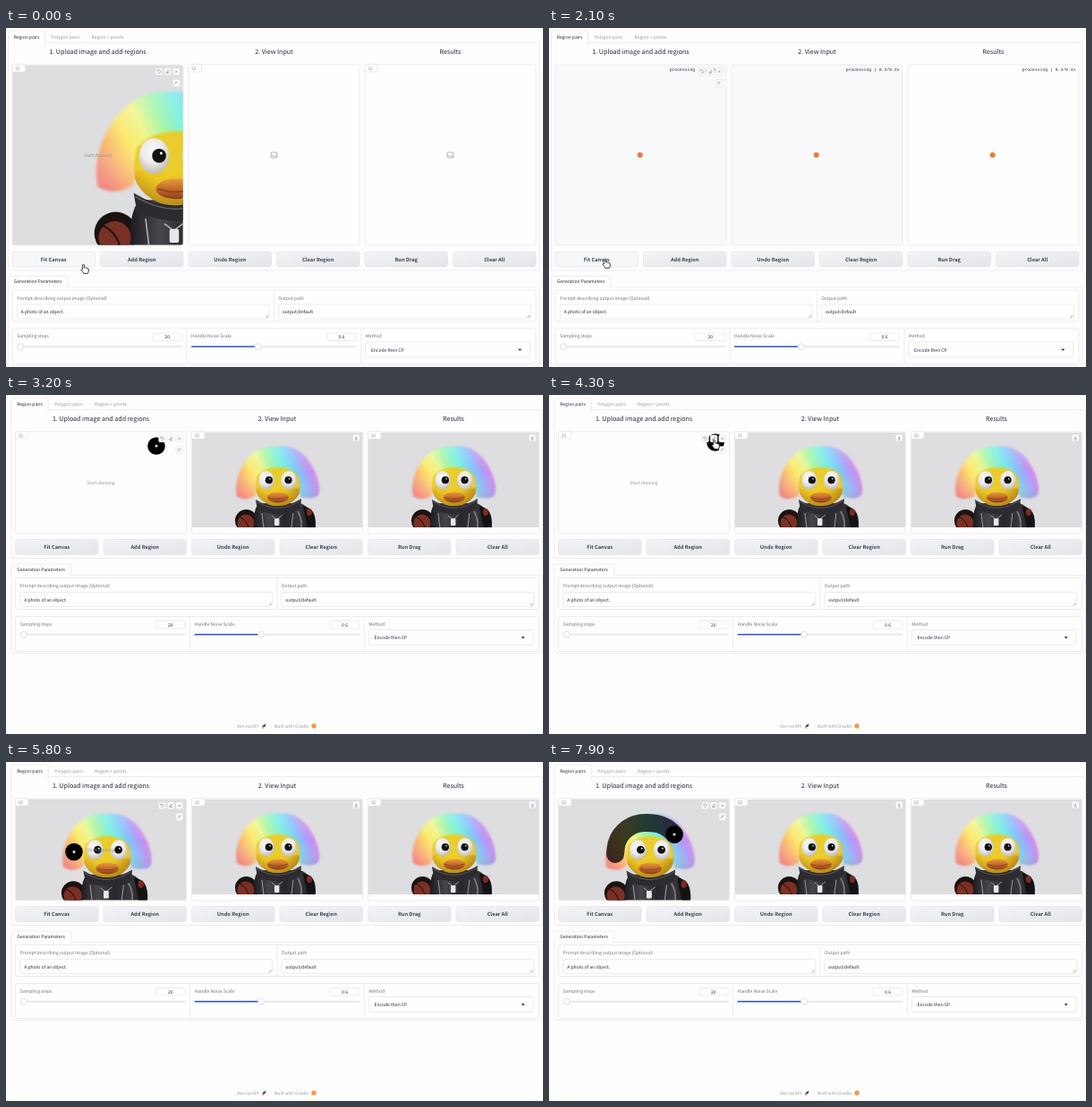
Recreate the animation shown at these times as an HTML page. Size 600 by 379 pixels, loop 8 s.

```html
<!DOCTYPE html>
<html lang="en">
<head>
<meta charset="utf-8">
<title>Region editor</title>
<style>
  html, body { margin: 0; width: 100%; height: 100%; overflow: hidden; background: #fefdfe; }
  svg { display: block; width: 100vw; height: 100vh; }
  text { font-family: "Noto Sans CJK JP", "Noto Sans CJK SC", "Noto Sans CJK", "Open Sans", sans-serif; white-space: pre; text-rendering: geometricPrecision; }
  .mono { font-family: "Liberation Mono", "DejaVu Sans Mono", monospace; }
  .line { fill: none; stroke: #e5e7eb; stroke-width: .7; }
  .box { fill: #fefefe; stroke: #e2e4e9; stroke-width: .7; }
  .icon { fill: none; stroke: #7b818c; stroke-width: .6; }
</style>
</head>
<body>
<svg id="stage" viewBox="0 0 600 379" preserveAspectRatio="none"></svg>
<script>
const LOOP = 8000;
const SHIFT = { x: 3.5, y: -88.5 };   // where the page moves once the canvas is fitted
const TIME = { busy: 1800, fitted: 2300, photo: 4700, draw: 6300 };
const COLUMNS = [7, 204, 401];
const INK = '#1f2937', MUTED = '#959aa4', LABEL = '#6b7280';

// Cursor centre: time, x, y
const CURSOR = [
  [0, 88, 269], [100, 88, 269], [300, 86, 268.5], [600, 79, 267], [1300, 64, 263],
  [2450, 64, 263], [2700, 95, 170], [3050, 168, 57], [3400, 168, 57], [4000, 186, 53],
  [4850, 186, 53], [5300, 118, 80], [5650, 76, 100.5], [6000, 76, 100.5], [6300, 74, 103]
];
// Share of the stroke drawn: time, length in pixels
const STROKE = [[6300, 0], [6600, 7], [6800, 11.5], [7000, 24], [7400, 60], [7900, 1], [8000, 1]];

const rect = (x, y, w, h, r = 2, attrs = 'class="box"') =>
  `<rect x="${x}" y="${y}" width="${w}" height="${h}" rx="${r}" ${attrs}/>`;
const path = (d, attrs = 'class="line"') => `<path d="${d}" ${attrs}/>`;
const text = (x, y, s, { size = 5, fill = LABEL, anchor = 'start', weight = 400, cls = '' } = {}) =>
  `<text x="${x}" y="${y}" font-size="${size}" fill="${fill}" text-anchor="${anchor}" font-weight="${weight}" class="${cls}">${s}</text>`;
const group = (id, body, attrs = '') => `<g id="${id}" ${attrs}>${body}</g>`;
const stops = list => list.map((c, i) =>
  `<stop offset="${i / (list.length - 1)}" stop-color="${c}"/>`).join('');

const defs = `<defs>
  <linearGradient id="hair" y1=".75" x2="1" y2=".45">${stops(['#f2937c', '#f9bd72', '#fbe96a', '#eef58c', '#9df5a4', '#6fefe0', '#7cc6fb', '#b793f6', '#f58bd2'])}</linearGradient>
  <linearGradient id="shine" x2="0" y2="1"><stop offset="0" stop-color="#fff" stop-opacity=".25"/><stop offset=".5" stop-color="#fff" stop-opacity="0"/><stop offset="1" stop-color="#f2558f" stop-opacity=".25"/></linearGradient>
  <radialGradient id="skin" cx=".42" cy=".35" r=".75">${stops(['#f6dc33', '#e9c522', '#a87516'])}</radialGradient>
  <radialGradient id="white" cx=".45" cy=".35" r=".7">${stops(['#fafafa', '#ecebea', '#b9b4aa'])}</radialGradient>
  <linearGradient id="beak" x2="0" y2="1">${stops(['#e3a03c', '#c8682c', '#86401c'])}</linearGradient>
  <linearGradient id="coat" x2="1">${stops(['#1c1c20', '#46464c', '#26262b', '#38383e', '#131316'])}</linearGradient>
  <linearGradient id="button" x2="1" y2="1">${stops(['#f3f4f6', '#e3e5ea'])}</linearGradient>
  <filter id="soft" x="-10%" y="-10%" width="120%" height="120%"><feGaussianBlur stdDeviation=".8"/></filter>
  <clipPath id="canvasClip">${rect(7.4, 41.4, 190.2, 201.2, 2, 'id="clipBox"')}</clipPath>
  <clipPath id="photoClip">${rect(0, 0, 190, 106, 0, '')}</clipPath>
</defs>`;

const HAIR = 'M50 71C47 55 53 38 65 26C74 17 84 15 96 16C112 13 128 24 135 39C141 50 144 62 141 70C135 75 128 73 121 72L118 48L95 40L73 48L71 70C64 75 56 75 50 71Z';
const eye = (x, pupil) => `
  <ellipse cx="${x}" cy="53.3" rx="8.8" ry="10.4" fill="url(#white)"/>
  <circle cx="${pupil}" cy="53.2" r="4.1" fill="#111"/>
  <circle cx="${pupil + 1.2}" cy="51.7" r=".8" fill="#fff"/>`;

const photo = group('photo', `
  ${rect(0, 0, 205, 106, 0, 'fill="#dedddf"')}
  <circle cx="60.5" cy="98.5" r="12.5" fill="#1b1210"/>
  <ellipse cx="60" cy="101" rx="9.5" ry="9.5" fill="#7a3024"/>
  ${path('M53 94Q62 98 64 110', 'fill="none" stroke="#1b0f0c" stroke-width="1"')}
  ${path('M70 106Q67 90 74 79L121 79Q135 84 137 106Z', 'fill="url(#coat)"')}
  ${path('M124 83Q137 83 138 100L138 106L129 106Z', 'fill="#131215"')}
  <ellipse cx="131" cy="89" rx="3" ry="4" fill="#7c2a22"/>
  <ellipse cx="96" cy="58" rx="26" ry="24.5" fill="url(#skin)"/>
  ${path('M71 75Q95 90 122 74L121 85Q98 97 73 86Z', 'fill="#2b2b30"')}
  ${path('M72 77Q96 92 121 76', 'fill="none" stroke="#606066" stroke-width=".8"')}
  ${path('M78 90L80 106M113 90L111 106M89 93L94.5 97L101 92', 'fill="none" stroke="#b5b5b8" stroke-width=".8"')}
  ${path('M118 88Q123 96 122 106', 'fill="none" stroke="#7d7d84" stroke-width="1.6"')}
  ${rect(92, 96, 5.5, 8, 1, 'fill="#e8e8e8"')}
  ${path(HAIR, 'fill="url(#hair)" filter="url(#soft)"')}
  ${path(HAIR, 'fill="url(#shine)" filter="url(#soft)"')}
  ${path('M72 62Q70 46 84 41Q97 36 111 42Q121 47 120 62Z', 'fill="#e9cd2e" filter="url(#soft)"')}
  ${eye(83, 85.9)}${eye(108, 107.6)}
  <ellipse cx="96" cy="72.5" rx="12" ry="6" fill="url(#beak)"/>
  ${path('M85 72.5Q96 76.5 107 72', 'fill="none" stroke="#87441c" stroke-width=".8"')}`);

const pictureIcon = (x, y, s) =>
  `<g transform="translate(${x} ${y}) scale(${s})">${rect(-3.3, -3, 6.6, 6, .6, 'class="icon"')}${path('M-3 2L-1 0L1 2L2 .8L3.2 2M1.2-1.2h.6', 'class="icon"')}</g>`;
const badge = x => path(`M${x} 41h14.5v6q0 2-2 2h-12.5Z`, 'class="box"') + pictureIcon(x + 6, 45.2, .55);
const iconButton = (x, y, d) => rect(x - 3.8, y - 3.8, 7.6, 7.6, 1.3) +
  `<g transform="translate(${x} ${y})">${path(d, 'class="icon"')}</g>`;

const tabs = rect(2.5, 3, 41, 18, 2) +
  path('M43.5 16.5H594Q596 16.5 596 18.5') +
  rect(3, 16.2, 40, 6, 0, 'fill="#fefdfe"') +
  text(23, 11.9, 'Region pairs', { fill: INK, anchor: 'middle' }) +
  text(66.5, 11.9, 'Polygon pairs', { fill: MUTED, anchor: 'middle' }) +
  text(113.5, 11.9, 'Region + points', { fill: MUTED, anchor: 'middle' });

const headings = ['1. Upload image and add regions', '2. View Input', 'Results']
  .map((s, i) => text(COLUMNS[i] + 95.5, 28.9, s, { size: 7.1, fill: INK, anchor: 'middle' })).join('');

const panels = COLUMNS.map(x => rect(x, 41, 191, 202, 2.5, 'class="box panel"')).join('');
const views = COLUMNS.slice(1);

const empty = group('empty', views.map(x => badge(x) + pictureIcon(x + 95.5, 142, 1)).join(''));
const filled = group('filled', views.map(x =>
  `<g transform="translate(${x + .4} 42)" clip-path="url(#photoClip)"><use href="#photo"/></g>` +
  badge(x) + iconButton(x + 183.7, 48, 'M0-2V1M-1.3-.2L0 1L1.3-.2M-1.8 2H1.8')).join(''));

const busy = group('busy', COLUMNS.map(x =>
  `<circle cx="${x + 94.7}" cy="142" r="3" fill="#ee7a35"/>` +
  text(x + 187.5, 47.8, '', { size: 4.75, fill: INK, anchor: 'end', cls: 'mono timer' })).join(''));

const tools = iconButton(171, 48.7, 'M-1.6-.8A1.8 1.8 0 1 1-1.5 1M-1.8-2V-.6H-.4') +
  iconButton(180.6, 48.7, 'M-1.8 1.9H1.8M-1.5 1L.7-1.8L1.8-.6L0 1.2Z') +
  iconButton(190.2, 48.7, 'M-1.4-1.4L1.4 1.4M1.4-1.4L-1.4 1.4') +
  iconButton(190.4, 61.4, 'M-1.7 1.8Q-1.6 0-.6.2L1.8-1.9M-1.7-1.2H0');

const buttons = ['Fit Canvas', 'Add Region', 'Undo Region', 'Clear Region', 'Run Drag', 'Clear All']
  .map((s, i) => {
    const x = COLUMNS[i >> 1] + (i % 2) * 98.5;
    return rect(x, 250, 92.5, 17, 3, `fill="url(#button)" stroke="#e0e3e8" stroke-width=".6" ${i ? '' : 'id="fit"'}`) +
      text(x + 46.2, 260.6, s, { size: 5.7, fill: '#374151', anchor: 'middle', weight: 700 });
  }).join('');

const field = (x, label, value) => text(x, 303.8, label) + rect(x, 309, 282, 16, 2) +
  text(x + 4.5, 319, value, { fill: INK }) + path(`M${x + 278} 323.6l2.6-2.6m-1.2 2.6l1.2-1.2`, 'class="icon"');
const slider = (x, label, value, knob) => text(x, 346.2, label) + rect(x + 151.5, 341, 33, 8.6, 2) +
  text(x + 168, 347.4, value, { fill: INK, anchor: 'middle' }) +
  rect(x, 355.6, 185, 1.5, .7, 'fill="#e2e4e9"') +
  (knob > 10 ? rect(x, 355.6, knob, 1.5, .7, 'fill="#3056d8"') : '') +
  `<circle cx="${x + knob}" cy="356.3" r="3.5" class="box" style="stroke:#cfd3da"/>`;

const settings = path('M2.5 290V279.5Q2.5 277.5 4.5 277.5H67Q69 277.5 69 279.5V290H594Q596 290 596 292V375Q596 377 594 377H4.5Q2.5 377 2.5 375Z') +
  text(35.5, 285.4, 'Generation Parameters', { fill: INK, anchor: 'middle' }) +
  rect(7, 293, 585, 35, 2.5) + path('M299.5 293V328') +
  field(12.3, 'Prompt describing output image (Optional)', 'A photo of an object.') +
  field(304.3, 'Output path', 'output/default') +
  rect(7, 336, 585, 39, 2.5) + path('M202 336V375M396.8 336V375') +
  slider(12.3, 'Sampling steps', '20', 4) + slider(207, 'Handle Noise Scale', '0.6', 74.5) +
  text(401.8, 346.2, 'Method') + rect(401.8, 351, 184, 17, 2) +
  text(408, 361.7, 'Encode then CP', { fill: INK }) +
  path('M572.2 358.7h4l-2 2.4Z', `fill="${INK}"`);

const footer = group('footer',
  text(257.5, 372, 'Use via API', { size: 4.9, fill: MUTED }) +
  path('M286 372.5l1-3.2l3.6-2l-1 3.6l-2 .4Z', 'fill="#4b5563"') +
  '<circle cx="287" cy="372" r="1.1" fill="#f59e42"/>' +
  text(296, 372, '·', { size: 4.9, fill: MUTED, anchor: 'middle' }) +
  text(300, 372, 'Built with Gradio', { size: 4.9, fill: MUTED }) +
  '<circle cx="344" cy="370" r="2.7" fill="#f29a4a"/>');

document.getElementById('stage').innerHTML = defs +
  rect(0, 0, 600, 379, 0, 'fill="#fefdfe"') +
  `<g class="shifted">${path('M2.5 18V', 'class="line" id="frame"')}${tabs}${headings}${panels}
    <g clip-path="url(#canvasClip)">${group('canvasPhoto', photo)}</g>
    ${group('canvasBadge', badge(7))}${empty}${filled}${busy}</g>` +
  group('lower', buttons + settings) + footer +
  path('M74 103C74.3 99 74.8 95 75.5 91.5C80 76 94 68 107 68C122 67.5 132 71 140 81',
    'id="stroke" fill="none" stroke="#000" stroke-opacity=".76" stroke-width="20" stroke-linecap="round"') +
  group('brush', '<circle r="9.8"/><circle r="1.3" fill="#fff"/><circle r="2" fill="none" stroke="#777" stroke-width=".4"/>') +
  `<g class="shifted">${group('hint', text(102.5, 0, 'Start drawing', { fill: '#8f949d', anchor: 'middle' }))}${tools}</g>` +
  group('hand', path('M-2.4 .8V-4.2Q-1.5-6-.6-4.2V-1Q.6-2 1.2-.6Q2.4-1.4 2.9-.1Q4.3-.6 4.3 1V2.8Q4 4.2 3.3 5.4H-1.2Q-2.2 3.4-4 1.4Q-4 .1-2.4 .8Z',
    'fill="#fff" stroke="#111" stroke-width=".8" stroke-linejoin="round"')) +
  group('arrow', path('M-3-5V3.5L-1 1.7L.4 4.8L1.8 4.2L.4 1.2H3Z', 'fill="#fff" stroke="#111" stroke-width=".7"'));

const $ = id => document.getElementById(id);
const all = selector => [...document.querySelectorAll(selector)];
const show = (id, on) => { $(id).style.display = on ? '' : 'none'; };
const place = (id, x, y) => $(id).setAttribute('transform', `translate(${x} ${y})`);
const shifted = all('.shifted'), panelBoxes = all('.panel'), timers = all('.timer');
const strokeLength = $('stroke').getTotalLength();
STROKE.slice(-2).forEach(key => { key[1] = strokeLength; });

function sample(keys, t) {
  const i = keys.findIndex(k => k[0] > t);
  if (i < 0) return keys[keys.length - 1].slice(1);
  if (i === 0) return keys[0].slice(1);
  const a = keys[i - 1], b = keys[i], p = (t - a[0]) / (b[0] - a[0]);
  return a.slice(1).map((v, j) => v + (b[j + 1] - v) * p);
}

function render(t) {
  const fitted = t >= TIME.fitted, working = t >= TIME.busy && !fitted, drawing = t >= TIME.draw;
  const height = fitted ? 114 : 202;
  const dx = fitted ? SHIFT.x : 0, dy = fitted ? SHIFT.y : 0;

  shifted.forEach(g => g.setAttribute('transform', `translate(${dx} 0)`));
  place('lower', dx, dy);
  $('frame').setAttribute('d', `M2.5 18V${269 + dy}Q2.5 ${271 + dy} 4.5 ${271 + dy}H594Q596 ${271 + dy} 596 ${269 + dy}V18`);
  panelBoxes.forEach((p, i) => {
    p.setAttribute('height', height);
    p.style.fill = working && i < 2 ? '#f9f9fb' : '';
  });
  $('clipBox').setAttribute('height', height - .8);
  $('canvasPhoto').setAttribute('transform', `translate(7 41.3) scale(${fitted ? 1.07 : 1.91})`);
  $('canvasPhoto').style.opacity = t < TIME.busy || t >= TIME.photo ? 1 : 0;
  show('canvasBadge', !working);
  show('empty', !fitted && !working);
  show('filled', fitted);
  show('busy', working);
  show('footer', fitted);
  const elapsed = Math.min(.3, Math.floor((t - TIME.busy) / 100) / 10).toFixed(1);
  timers.forEach(el => { el.textContent = `processing | ${elapsed}/0.3s`; });
  show('hint', !working && !drawing);
  place('hint', 0, fitted ? 99.8 : 143.8);
  $('fit').setAttribute('fill', fitted ? 'url(#button)' : '#f6f7f9');

  const drawn = sample(STROKE, t)[0];
  show('stroke', drawing);
  $('stroke').setAttribute('stroke-dasharray', `${Math.max(drawn, .01)} 400`);
  let [x, y] = sample(CURSOR, t);
  if (drawing) ({ x, y } = $('stroke').getPointAtLength(drawn));

  const inCanvas = fitted && y < 155;
  const overTool = t >= 3950 && t < 4900;
  show('brush', inCanvas);
  show('hand', !fitted || overTool);
  show('arrow', fitted && !inCanvas);
  place('brush', x, y);
  place('hand', x, y + (overTool ? 2 : 0));
  place('arrow', x, y);
}

function tick() {
  render(performance.now() % LOOP);
  requestAnimationFrame(tick);
}
tick();
</script>
</body>
</html>
```
